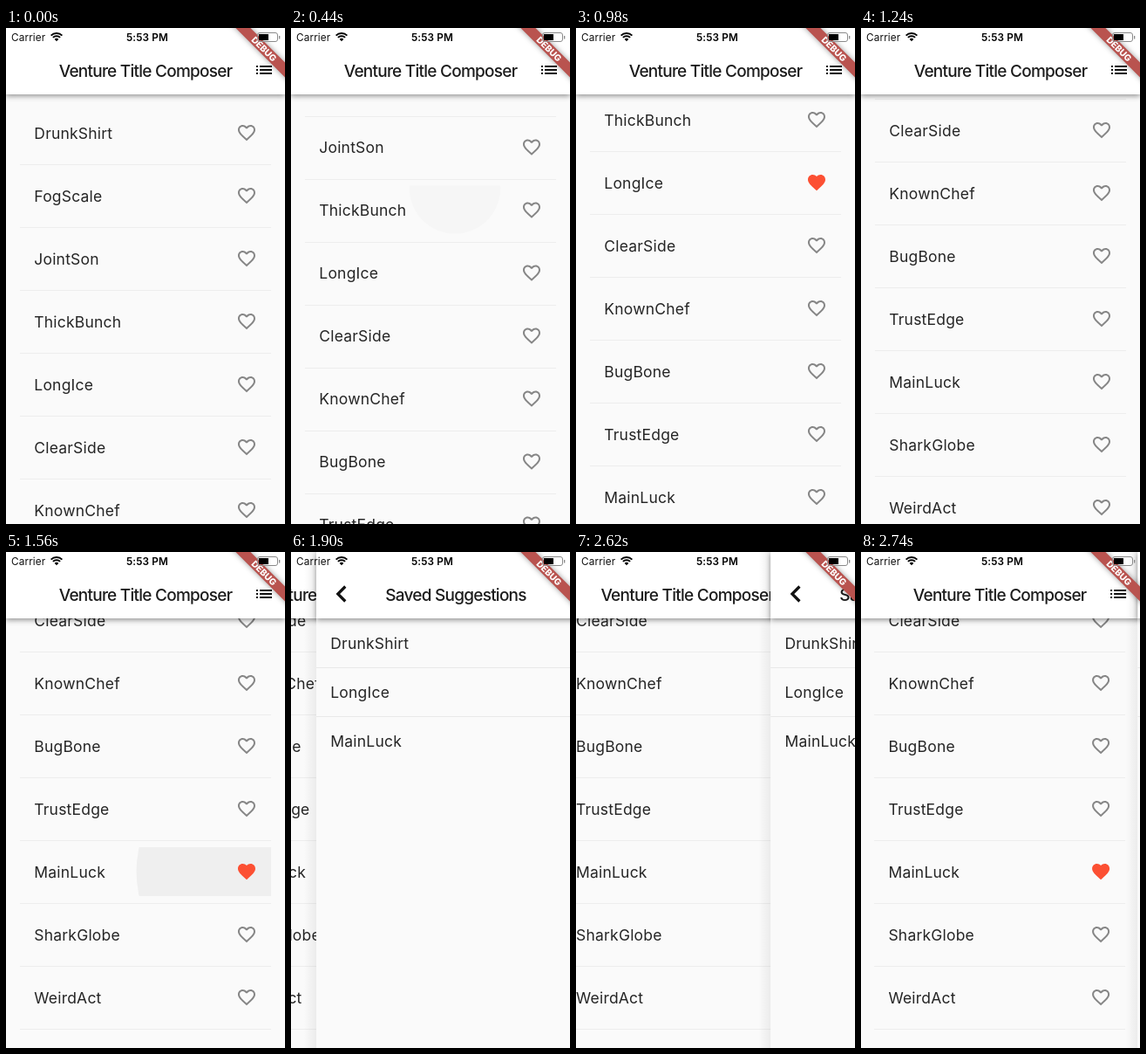
An HTML page with a canvas for the animation above (2.76 s loop, 320 px wide and 568 px high).

```html
<!DOCTYPE html>
<html lang="en">
<head>
<meta charset="utf-8">
<title>Saved names</title>
<style>
  html, body { margin: 0; width: 100%; height: 100%; overflow: hidden; background: #fafafa; }
  canvas { display: block; width: 320px; height: 568px; }
</style>
</head>
<body>
<canvas></canvas>
<script>
const W = 320, H = 568, LOOP = 2760, BAR = 76;
const canvas = document.querySelector('canvas');
const ctx = canvas.getContext('2d');
const ratio = window.devicePixelRatio || 1;
canvas.width = W * ratio;
canvas.height = H * ratio;

const names = ['DrunkShirt', 'FogScale', 'JointSon', 'ThickBunch', 'LongIce', 'ClearSide',
  'KnownChef', 'BugBone', 'TrustEdge', 'MainLuck', 'SharkGlobe', 'WeirdAct'];
const savedAt = { 0: 60, 4: 770, 9: 1480 };
// Touches on rows: x is relative to the stage, y to the tile top.
const ripples = [
  { row: 0, x: 276, y: 28, start: 10, life: 230, radius: 288, alpha: .045 },
  { row: 3, x: 188, y: 3, start: 300, life: 240, radius: 89, alpha: .018 },
  { row: 4, x: 276, y: 28, start: 740, life: 230, radius: 288, alpha: .045 },
  { row: 9, x: 276, y: 28, start: 1460, life: 230, radius: 288, alpha: .045 }
];

const heartOuter = 'M12 21.35l-1.45-1.32C5.4 15.36 2 12.28 2 8.5 2 5.42 4.42 3 7.5 3c1.74 0 3.41.81 4.5 2.09C13.09 3.81 14.76 3 16.5 3 19.58 3 22 5.42 22 8.5c0 3.78-3.4 6.86-8.55 11.54z';
const heartInner = 'M12.1 18.55l-.1.1-.1-.1C7.14 14.24 4 11.39 4 8.5 4 6.5 5.5 5 7.5 5c1.54 0 3.04.99 3.57 2.36h1.87C13.46 5.99 14.96 5 16.5 5c2 0 3.5 1.5 3.5 3.5 0 2.89-3.14 5.74-7.9 10.05z';
const fullHeart = new Path2D(heartOuter);
const emptyHeart = new Path2D(heartOuter + heartInner);

const progress = (t, from, to) => Math.min(1, Math.max(0, (t - from) / (to - from)));
const fling = s => { const u = s ** .8; return u * u * (3 - 2 * u); };
const settle = s => 1 - (1 - s) ** 1.8;

function scrollAt(t) {
  return 231 * fling(progress(t, 220, 704)) + 171 * fling(progress(t, 980, 1394));
}

function rect(x, y, w, h, color) {
  ctx.fillStyle = color;
  ctx.fillRect(x, y, w, h);
}

function text(str, x, y, { size = 17.5, weight = 400, spacing = .2, align = 'left', color = '#252525' } = {}) {
  ctx.font = `${weight} ${size}px Inter, sans-serif`;
  ctx.letterSpacing = spacing + 'px';
  ctx.textAlign = align;
  ctx.fillStyle = color;
  ctx.fillText(str, x, y);
}

function at(x, y, draw) {
  ctx.save();
  ctx.translate(x, y);
  draw();
  ctx.restore();
}

function header(title) {
  ctx.save();
  ctx.shadowColor = 'rgba(0,0,0,.42)';
  ctx.shadowBlur = 6 * ratio;
  ctx.shadowOffsetY = 2 * ratio;
  rect(0, 0, W, BAR, '#fff');
  ctx.restore();
  text(title, 160, 55.5, { size: 19, weight: 500, spacing: -.75, align: 'center', color: '#1c1c1c' });
}

function drawRipple({ row, x, y, start, life, radius, alpha }, t, scroll) {
  const p = (t - start) / life;
  if (p <= 0 || p >= 1) return;
  const top = 92 + row * 72 - scroll;
  ctx.save();
  ctx.beginPath();
  ctx.rect(16, top, 288, 56);
  ctx.clip();
  ctx.beginPath();
  ctx.arc(x, top + y, radius * p, 0, 7);
  ctx.fillStyle = `rgba(0,0,0,${alpha * Math.min(1, (1 - p) * 2)})`;
  ctx.fill();
  ctx.restore();
}

function listPage(t) {
  const scroll = Math.round(scrollAt(t) * 2) / 2;
  rect(0, 0, W, H, '#fafafa');
  ripples.forEach(r => drawRipple(r, t, scroll));
  names.forEach((name, i) => {
    const y = 120 + i * 72 - scroll;
    text(name, 32.3, y + 6.5);
    rect(16, Math.round(y + 36), 288, 1, '#ededed');
    at(264, y - 12, () => {
      const saved = t >= savedAt[i];
      ctx.fillStyle = saved ? '#fc5033' : '#868686';
      ctx.fill(saved ? fullHeart : emptyHeart, 'evenodd');
    });
  });
  header('Venture Title Composer');
  for (const y of [43, 47, 51]) {
    rect(287, y, 2, 2, '#111');
    rect(291, y, 14, 2, '#111');
  }
}

function savedPage() {
  const edge = ctx.createLinearGradient(-14, 0, 0, 0);
  edge.addColorStop(0, 'rgba(0,0,0,0)');
  edge.addColorStop(1, 'rgba(0,0,0,.06)');
  rect(-14, 0, 14, H, edge);
  rect(0, 0, W, H, '#fafafa');
  Object.keys(savedAt).forEach((row, i) => {
    text(names[row], 16.3, 110.5 + i * 56);
    if (i) rect(0, 76 + i * 56, W, 1, '#e9e9e9');
  });
  header('Saved Suggestions');
  ctx.lineWidth = 3.2;
  ctx.strokeStyle = '#111';
  ctx.stroke(new Path2D('M33.3 39.5L24.8 48L33.3 56.5'));
}

function statusBar() {
  text('Carrier', 6, 14.7, { size: 11.8, spacing: .1, color: '#111' });
  text('5:53 PM', 162, 14.7, { size: 11.8, weight: 600, spacing: .15, align: 'center', color: '#000' });

  ctx.strokeStyle = ctx.fillStyle = '#000';
  ctx.lineWidth = 2;
  for (const r of [9, 5.8]) {
    ctx.beginPath();
    ctx.arc(58, 15, r, -Math.PI * .75, -Math.PI * .25);
    ctx.stroke();
  }
  ctx.fill(new Path2D('M58 15.2L55.6 12.7Q58 10.6 60.4 12.7Z'));

  ctx.lineWidth = 1;
  ctx.strokeStyle = '#8a8a8a';
  ctx.beginPath();
  ctx.roundRect(288.5, 5.5, 23, 10, 2.5);
  ctx.stroke();
  rect(290, 7, 11, 7, '#000');
  rect(313, 9, 1.3, 3.5, '#8a8a8a');
}

function debugBanner() {
  at(W, 0, () => {
    ctx.rotate(Math.PI / 4);
    ctx.save();
    ctx.shadowColor = 'rgba(0,0,0,.4)';
    ctx.shadowBlur = 6 * ratio;
    rect(-60, 28, 120, 12, '#b9534f');
    ctx.restore();
    text('DEBUG', 0, 37.7, { size: 10.2, weight: 800, spacing: 0, align: 'center', color: '#fff' });
  });
}

function draw(t) {
  const open = settle(progress(t, 1680, 1980)) - settle(progress(t, 2490, LOOP));
  ctx.setTransform(ratio, 0, 0, ratio, 0, 0);
  rect(0, 0, W, H, '#fafafa');
  if (open < 1) at(-open * W / 3, 0, () => listPage(t));
  if (open > 0) at((1 - open) * W, 0, savedPage);
  debugBanner();
  statusBar();
}

const begin = performance.now();
function tick() {
  draw((performance.now() - begin) % LOOP);
  requestAnimationFrame(tick);
}
tick();
</script>
</body>
</html>
```
